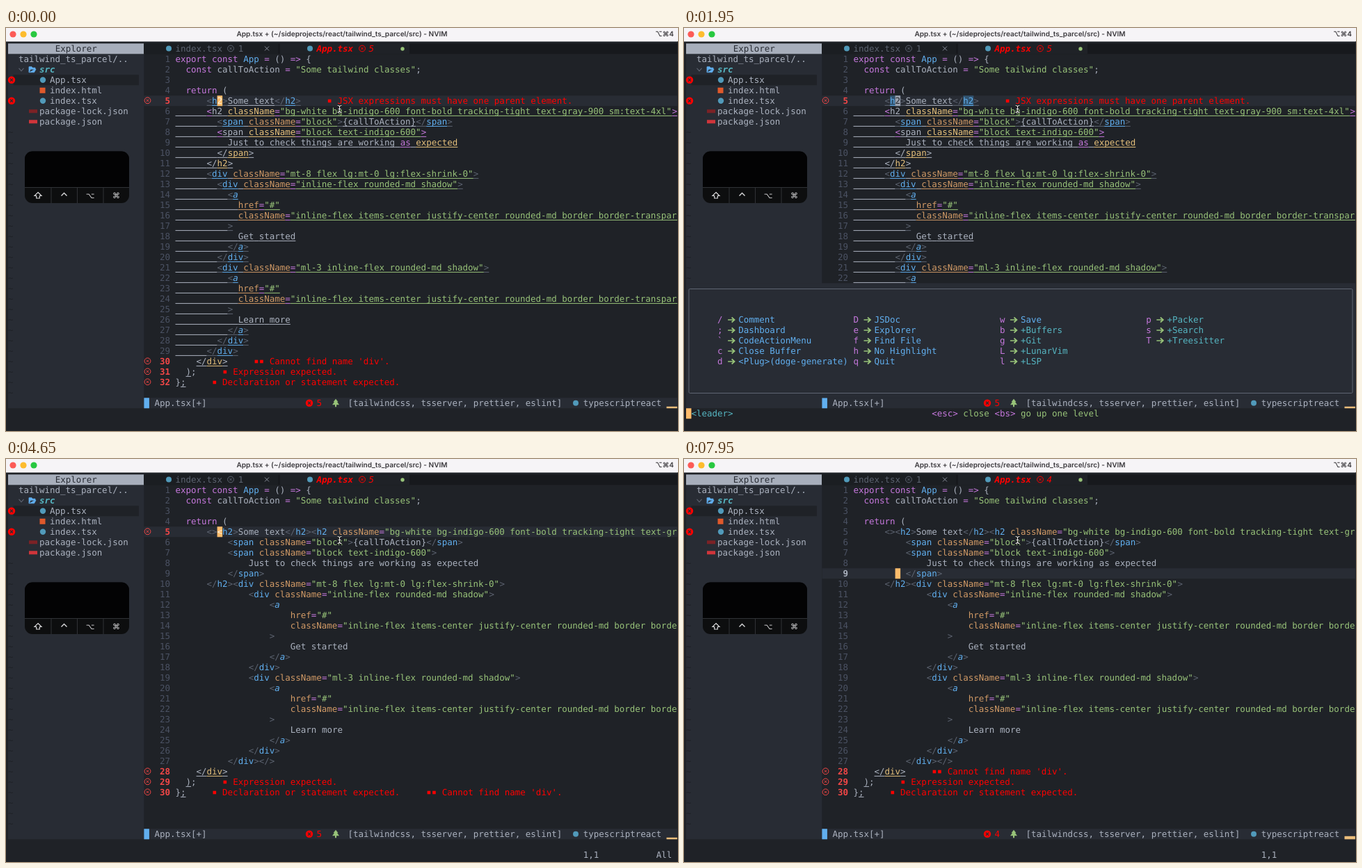
An HTML page for the animation above (8 s loop, 966x580 px).

```html
<!DOCTYPE html>
<html lang="en">
<head>
<meta charset="utf-8">
<title>Editor session</title>
<style>
  html, body { margin: 0; width: 100%; height: 100%; overflow: hidden; background: #1f2227; }
  svg { display: block; width: 966px; height: 580px; }
  text { white-space: pre; text-rendering: geometricPrecision; font: 12.48px "DejaVu Sans Mono", "Liberation Mono", monospace; }
  .b { font-weight: bold; }
  .i { font-style: italic; }
  .ui { font: 600 10.05px Inter, "Open Sans", sans-serif; }
  .sym { font: 11px "DejaVu Sans", sans-serif; }
</style>
</head>
<body>
<svg id="stage" viewBox="0 0 966 580"></svg>
<script>
const LOOP = 8000, CW = 7.515, RH = 15, LEFT = 3, TOP = 22.3, CODE = 32;
const C = {
  bg: '#1f2227', side: '#282c34', fg: '#abb2bf', dim: '#5c6370', num: '#4b5263', blue: '#61afef',
  purple: '#c678dd', green: '#98c379', orange: '#d19a66', yellow: '#e5c07b', cyan: '#56b6c2',
  red: '#ff0000', soft: '#f44747', cursor: '#ffbc6b', match: '#31536f', react: '#519aba'
};

const X = col => LEFT + col * CW;
const Y = row => TOP + row * RH;
const esc = s => s.replace(/&/g, '&amp;').replace(/</g, '&lt;').replace(/>/g, '&gt;');
const rect = (x, y, w, h, fill, more = '') => `<rect x="${x}" y="${y}" width="${w}" height="${h}" fill="${fill}" ${more}/>`;
const cells = (col, row, n, fill, rows = 1) => rect(X(col), Y(row), n * CW, rows * RH, fill);
const text = (col, row, s, fill = C.fg, cls = '') =>
  `<text x="${X(col).toFixed(2)}" y="${Y(row) + 11.7}" fill="${fill}" class="${cls}">${esc(s)}</text>`;
const dot = (x, y, r, fill) => `<circle cx="${x}" cy="${y}" r="${r}" fill="${fill}"/>`;
const path = (d, stroke, w = 1, fill = 'none') => `<path d="${d}" stroke="${stroke}" stroke-width="${w}" fill="${fill}"/>`;
const cross = (x, y, r, color, w = 1) => path(`M${x - r} ${y - r}l${2 * r} ${2 * r}m0 ${-2 * r}l${-2 * r} ${2 * r}`, color, w);
const ringX = (x, y, color) => `<circle cx="${x}" cy="${y}" r="4.4" fill="none" stroke="${color}"/>` + cross(x, y, 1.7, color);
const discX = (x, y) => dot(x, y, 5.2, C.red) + cross(x, y, 2, C.side, 1.3);
const frame = (x, y, w, h, stroke) => rect(x, y, w, h, 'none', `stroke="${stroke}" rx="1.5"`);

// Each entry: indent, source. A leading "!" marks text the parser could not recover.
const HEAD = [[0, 'export const App = () => {'], [2, 'const callToAction = "Some tailwind classes";'], [0, ''], [2, 'return (']];
const TAIL = [[4, '!</div>'], [2, ');'], [0, '};']];
const H2 = '<h2 className="bg-white bg-indigo-600 font-bold tracking-tight text-gray-900 sm:text-4xl">';
const SPAN = '<span className="block">{callToAction}</span>';
const SPAN2 = '<span className="block text-indigo-600">';
const JUST = 'Just to check things are working as expected';
const MT = '<div className="mt-8 flex lg:mt-0 lg:flex-shrink-0">';
const button = (pad, step, open, label) => [
  [pad, `<div className="${open}inline-flex rounded-md shadow">`], [pad + step, '<a'], [pad + 2 * step, 'href="#"'],
  [pad + 2 * step, 'className="inline-flex items-center justify-center rounded-md border border-transparent'],
  [pad + step, '>'], [pad + 2 * step, label], [pad + step, '</a>'], [pad, '</div>']
];
const before = [
  ...HEAD, [6, '<h2>Some text</h2>'], [6, '!' + H2], [8, SPAN], [8, '!' + SPAN2], [10, '!' + JUST], [8, '!</span>'], [6, '!</h2>'],
  [6, MT], ...button(8, 2, '', 'Get started'), ...button(8, 2, 'ml-3 ', 'Learn more'), [6, '</div>'], ...TAIL
];
const after = [
  ...HEAD, [6, '<><h2>Some text</h2>' + H2], [10, SPAN], [10, SPAN2], [14, JUST], [10, '</span>'], [6, '</h2>' + MT],
  ...button(14, 4, '', 'Get started'), ...button(14, 4, 'ml-3 ', 'Learn more'), [10, '</div></>'], ...TAIL
];

function tokens(src) {
  const bad = src[0] === '!', out = [];
  if (bad) src = src.slice(1);
  let tag = false, closing = false;
  for (const m of src.matchAll(/"[^"]*"?|<\/?|=>|[A-Za-z][\w-]*|\s+|./g)) {
    const s = m[0], next = src[m.index + s.length];
    let color = C.fg, cls = '';
    if (s[0] === '"') color = C.green;
    else if (s[0] === '<') {
      closing = s === '</';
      color = !bad ? C.dim : closing ? C.fg : C.purple;
    } else if (s === '>') color = !bad ? C.dim : closing ? C.fg : C.purple;
    else if (/^(export|const|return|=|=>)$/.test(s)) color = C.purple;
    else if (s === 'App') color = C.blue;
    else if (tag) {
      color = !bad ? C.blue : closing ? C.yellow : C.fg;
      if (s === 'a') cls = 'i';
    } else if (/^\w/.test(s) && next === '=') color = bad ? C.yellow : C.orange;
    else if (bad && s === 'as') color = C.purple;
    else if (bad && s === 'expected') color = C.yellow;
    tag = s[0] === '<';
    out.push({ s, color, cls, at: m.index });
  }
  return out;
}

function codeLine([pad, src], row, under) {
  let out = '';
  const line = (col, n, color) => rect(X(CODE + col), Y(row) + 13.6, n * CW, 1, color);
  if (under === 'full') out += line(0, pad, C.fg);
  tokens(src).forEach(t => {
    const col = pad + t.at;
    if (t.s.trim()) out += text(CODE + col, row, t.s, t.color, t.cls);
    if (under && under !== 'last' && under !== 'first') out += line(col, t.s.length, t.color);
  });
  if (under === 'first') out += line(pad, 1, C.fg);
  if (under === 'last') out += line(pad + 1, 1, C.fg);
  return out;
}

function hint(col, row, msg, marks = 1) {
  let out = text(col, row, msg, C.red);
  for (let i = 0; i < marks; i++) out += rect(X(col - 1 - marks + i) + 1.4, Y(row) + 5.4, 4.6, 4.6, C.red);
  return out;
}

function listing(s) {
  const lines = s.fixed ? after : before, n = lines.length;
  const bad = s.fixed ? [n - 2, n - 1, n] : [5, n - 2, n - 1, n];
  if (s.stale) bad.push(5);
  let out = cells(26, s.row, 102, C.side);
  if (s.match) out += cells(CODE + 7, 5, 2, C.match) + cells(CODE + 21, 5, 2, C.match);
  lines.forEach((l, i) => {
    const row = i + 1, err = bad.includes(row), cur = row === s.row;
    let under = '';
    if (!s.fixed && row >= 5 && row <= n - 3) under = row === 5 ? 'text' : 'full';
    if (row === n - 2) under = 'text';
    if (row === n - 1) under = 'first';
    if (row === n) under = 'last';
    out += text(31 - String(row).length, row, '' + row, err ? C.soft : cur ? C.fg : C.num, err || cur ? 'b' : '');
    out += codeLine(l, row, under);
    if (err) out += ringX(203.5, Y(row) + 7, C.soft);
  });
  if (!s.fixed) out += hint(63, 5, 'JSX expressions must have one parent element.');
  out += s.stale ? hint(83, n, "Cannot find name 'div'.", 2) : hint(50, n - 2, "Cannot find name 'div'.", 2);
  out += hint(43, n - 1, 'Expression expected.') + hint(41, n, 'Declaration or statement expected.');
  if (s.cursor) {
    out += cells(CODE + 8, s.row, 1, s.cursor);
    const ch = s.row > 5 ? '' : s.fixed ? '<' : '2';
    out += text(CODE + 8, s.row, ch, s.cursor === C.cursor ? '#fff1dc' : C.side);
  }
  return out;
}

function titleBar(s) {
  const title = s.actions ? '[No Name] - - NVIM' : 'App.tsx + (~/sideprojects/react/tailwind_ts_parcel/src) - NVIM';
  return rect(0, 0, 966, 19.5, '#f6f4f7') + dot(10, 9, 4.6, '#fc5b57') + dot(25, 9, 4.6, '#fdbc2e') + dot(40, 9, 4.6, '#28c840') +
    `<text x="483" y="12.4" text-anchor="middle" fill="#3c3a3e" class="ui">${title}</text>` +
    `<text x="960" y="11.8" text-anchor="end" fill="#3c3a3e" class="ui" style="font-family:Inter,'DejaVu Sans',sans-serif">⌥⌘4</text>`;
}

function tabs(s) {
  const y = Y(0) + 7.2, on = !s.actions, hue = on ? C.red : C.dim;
  return cells(26, 0, 102, '#17191d') + rect(198, Y(0), 193, RH, '#1b1e22') + rect(394, Y(0), 186, RH, C.bg) +
    dot(234, y, 4, C.react) + text(32, 0, 'index.tsx', C.dim) + ringX(323, y, C.dim) + text(44, 0, '1', C.dim) + cross(375, y, 3, '#8a909c') +
    dot(437, y, 4, C.react) + text(59, 0, 'App.tsx', hue, on ? 'b i' : '') + ringX(512, y, hue) +
    text(69, 0, '' + s.count, hue, on ? 'i' : '') + dot(570, y + .5, 2.7, C.green);
}

function sidebar() {
  const mid = r => Y(r) + 7.5;
  let out = rect(LEFT, Y(0), 195.3, RH * 35, C.side) + cells(0, 0, 26, '#a7aebb') + text(9, 0, 'Explorer', C.side);
  out += text(2, 1, 'tailwind_ts_parcel/..') + path(`M18.5 ${mid(2) - 2}l3.5 4l3.5 -4`, C.dim, 1.1);
  out += path(`M33 ${mid(2) + 4}v-8h4l1 1.5h4v2h-6.5l-2.5 4.5h7.5l2.5 -4.5h-2`, C.blue, .8, C.blue);
  out += text(6, 2, 'src', C.cyan, 'b i') + cells(1, 3, 24, C.bg);
  ['App.tsx', 'index.html', 'index.tsx'].forEach((name, i) => {
    out += text(8, i + 3, name);
    out += i === 1 ? rect(48.5, mid(4) - 4, 8, 8, '#e0592b') : dot(53, mid(i + 3), 4.2, C.react) + discX(8, mid(i + 3));
  });
  out += rect(33, mid(6) - 2.5, 12, 5, '#7c2226') + text(6, 6, 'package-lock.json');
  out += rect(33, mid(7) - 2.5, 12, 5, '#d0353b') + text(6, 7, 'package.json');
  for (let r = 8; r < 34; r++) out += text(0, r, '~', C.bg);
  return out;
}

function keyPad() {
  const ink = '#d8d8da';
  return rect(27, 177.5, 150, 74.5, '#0d0e0f', 'rx="11"') + path('M27 229v-40.500a11 11 0 0 1 11 -11h128a11 11 0 0 1 11 11v40.500z', 'none', 0, '#030304') +
    path('M27 229.500h150M65 230v22M102.500 230v22M140 230v22', '#303236') +
    path('M46 236.500l5 5h-2.700v3.500h-4.600v-3.500h-2.700z', ink, 1.2) + path('M79.500 241.500l4 -4l4 4', ink, 1.4) +
    `<text x="121" y="245" text-anchor="middle" fill="${ink}" class="sym">⌥</text>` +
    `<text x="158.500" y="245" text-anchor="middle" fill="${ink}" class="sym">⌘</text>`;
}

function status(s) {
  const y = Y(34) + 7.4;
  let out = cells(26, 34, 102, C.side);
  if (s.actions) return out + text(27, 34, 'App.tsx[+]', C.dim);
  out += cells(26, 34, 1, C.blue) + text(28, 34, 'App.tsx[+]') + discX(436, y) + text(59, 34, '' + s.count, C.red);
  out += path(`M474 ${y - 6}l3.500 4.500h-1.500l3 4h-4v3h-2v-3h-4l3 -4h-1.500z`, 'none', 0, C.green);
  out += text(65, 34, '[tailwindcss, tsserver, prettier, eslint]') + dot(819, y, 4, C.react) + text(110, 34, 'typescriptreact');
  return out + rect(949.5, Y(35) - s.bar, 15.4, s.bar, '#ecbe7b');
}

function diagnostic() {
  return cells(40, 6, 67, C.side, 3) + frame(307.5, 120.5, 496, 29.5, '#6c7380') +
    text(42, 7, 'typescript: JSX expressions must have one parent element. [2657]', C.red);
}

function codeActions() {
  let out = cells(41, 6, 45, C.side, 3) + frame(315, 120.5, 331, 29.5, '#8a919e') + cells(42, 7, 1, C.cursor) +
    text(43, 7, '[1]', C.purple) + text(47, 7, '(quickfix)', C.yellow) + text(58, 7, 'Wrap in JSX fragment');
  out += cells(41, 9, 46, C.side, 8) + frame(315, 165, 338, 105, '#6c7380') + text(42, 10, 'Wrap in JSX fragment', C.blue, 'b');
  [['Kind:', 'quickfix'], ['Name:', '_typescript.applyWorkspaceEdit'], ['Preferred:', 'no'], ['Disabled:', 'no']]
    .forEach(([k, v], i) => out += text(42, 12 + i, k, C.blue) + text(55, 12 + i, v));
  return out;
}

const MENU = [
  [6, '/Comment', ';Dashboard', '`CodeActionMenu', 'cClose Buffer', 'd<Plug>(doge-generate)'],
  [32, 'DJSDoc', 'eExplorer', 'fFind File', 'hNo Highlight', 'qQuit'],
  [60, 'wSave', 'b+Buffers', 'g+Git', 'L+LunarVim', 'l+LSP'],
  [88, 'p+Packer', 's+Search', 'T+Treesitter']
];
function menu() {
  let out = rect(LEFT, Y(23), 962, RH * 11, C.side) + frame(7, 375.5, 954, 150, '#5f6673');
  for (const [col, ...items] of MENU) items.forEach((it, i) => {
    const label = it.slice(1), y = Y(26 + i) + 7.7, x = X(col + 2);
    out += text(col, 26 + i, it[0], C.purple) + path(`M${x} ${y}h9M${x + 5.5} ${y - 3.5}l4 3.500l-4 3.500`, C.green, 1.7);
    out += text(col + 4, 26 + i, label, label[0] === '+' ? C.cyan : C.blue);
  });
  return out + text(1, 35, '<leader>', C.cyan) + text(47, 35, '<esc>', C.purple) + text(53, 35, 'close', C.green) +
    text(59, 35, '<bs>', C.purple) + text(64, 35, 'go up one level', C.green);
}

const pointer = () => {
  const d = 'M476.500 111.500q3 0 3 2v6q0 2 -3 2M482.500 111.500q-3 0 -3 2v6q0 2 3 2M477.500 116.500h4';
  return path(d, '#111', 2.6) + path(d, '#e8e8e8', 1.1);
};

function draw(s) {
  let out = rect(0, 0, 966, 580, C.bg) + titleBar(s) + sidebar() + tabs(s) + listing(s) + status(s);
  if (s.diag) out += diagnostic();
  if (s.actions) out += codeActions();
  if (s.menu) out += menu();
  if (s.prompt) out += cells(0, 35, 1, C.cursor);
  if (s.keys) out += text(117, 36, s.keys);
  if (s.pos) out += text(110, 36, '1,1');
  if (s.all) out += text(124, 36, 'All');
  return out + keyPad() + pointer() + rect(965, 19.5, 1, 561, C.bg);
}

// Each step changes only what it names.
const steps = [
  [0, { row: 5, cursor: C.cursor, count: 5, bar: 2.5 }],
  [300, { diag: true, match: true }],
  [450, { keys: '<20>' }],
  [600, { keys: '', cursor: '', prompt: true }],
  [750, { diag: false, menu: true, cursor: '#9aa1ad' }],
  [2400, { menu: false, prompt: false, match: false, cursor: '', actions: true, pos: true, all: true }],
  [4650, { actions: false, fixed: true, stale: true, cursor: C.cursor }],
  [4950, { stale: false, count: 4 }],
  [7500, { row: 6, all: false }],
  [7650, { row: 7, bar: 4.5 }],
  [7800, { row: 8 }],
  [7950, { row: 9 }]
];
const stage = document.getElementById('stage');
const scenes = steps.map((_, i) => draw(Object.assign({}, ...steps.slice(0, i + 1).map(st => st[1]))));
const start = performance.now();
let shown = -1;
function tick() {
  const t = Math.max(0, performance.now() - start) % LOOP;
  const i = steps.filter(st => st[0] <= t).length - 1;
  if (i !== shown) stage.innerHTML = scenes[shown = i];
  requestAnimationFrame(tick);
}
tick();
</script>
</body>
</html>
```
